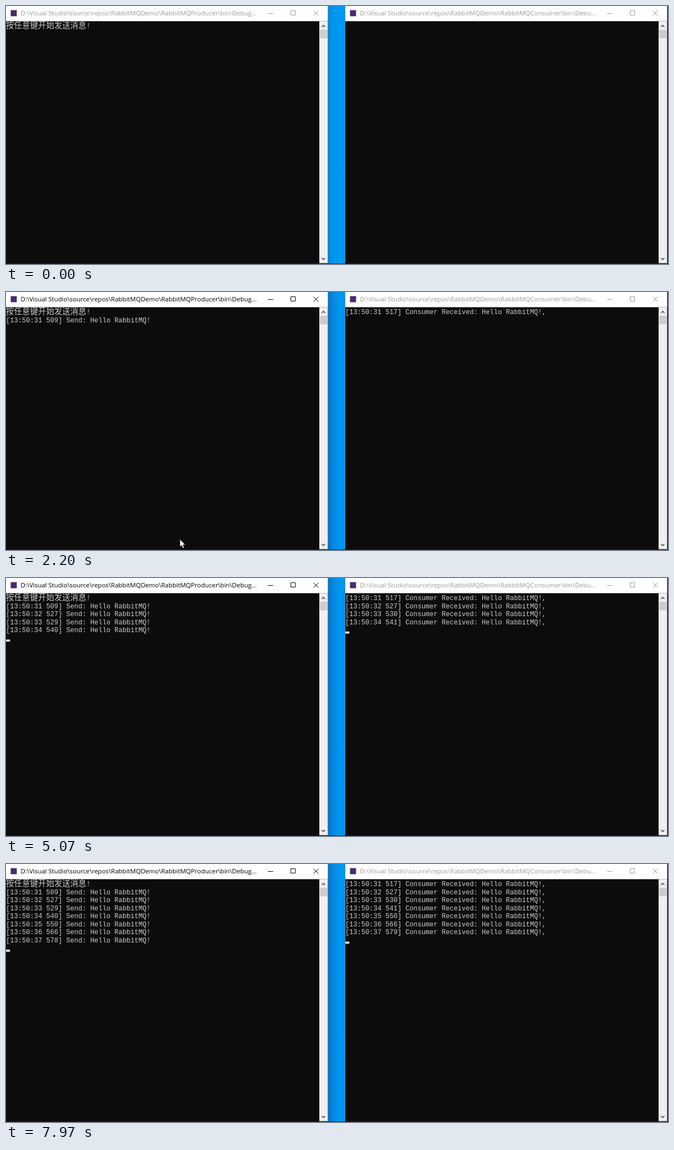
Animation of 1198x467 px, one loop 8000 ms. Source, as an HTML page:

```html
<!DOCTYPE html>
<html lang="zh">
<head>
<meta charset="utf-8">
<title>RabbitMQ demo</title>
<style>
  html, body { margin: 0; width: 100%; height: 100%; overflow: hidden; background: #0c0c0c; }
  svg { display: block; width: 1198px; height: 467px; }
  text { white-space: pre; }
  .title { font: 11.5px "Open Sans", "Noto Sans", sans-serif; }
  .log { font: 12.12px "Liberation Mono", "Courier New", monospace; fill: #ccc; }
  .cjk { font: 300 14.54px "Noto Sans CJK SC", "Noto Sans CJK", sans-serif; fill: #ccc; }
  .win { color: #999; }
  .win.active { color: #000; }
  .bar { fill: currentColor; }
  .icon { fill: none; stroke: currentColor; }
  .arrow { fill: none; stroke: #505050; stroke-width: 1.7; }
</style>
</head>
<body>
<svg id="stage" viewBox="0 0 1198 467">
  <defs>
    <linearGradient id="calm">
      <stop offset="0" stop-color="#0486d8"/>
      <stop offset=".22" stop-color="#0294ea"/>
      <stop offset=".7" stop-color="#0099f3"/>
      <stop offset="1" stop-color="#0294ea"/>
    </linearGradient>
    <linearGradient id="deep">
      <stop offset="0" stop-color="#0674c4"/>
      <stop offset=".3" stop-color="#038ae2"/>
      <stop offset=".7" stop-color="#0097f1"/>
      <stop offset="1" stop-color="#0294ea"/>
    </linearGradient>
  </defs>
  <rect id="desk" x="583" width="31" height="467" fill="url(#calm)"/>
</svg>
<script>
const LOOP = 8000, BLINK = 530, CELL = 7.272, ROW = 14.55, TOP = 27.5;
const FOCUS = 500;
const sends = [1670, 2700, 3700, 4700, 5700, 6700, 7730];
const sentMs = [509, 527, 529, 540, 550, 566, 578];
const gotMs = [517, 527, 530, 541, 550, 566, 579];
const stage = document.getElementById('stage');
const $ = id => document.getElementById(id);

const logs = (stamps, label, end, firstRow) => stamps.map((ms, i) =>
  `<text class="log line${i}" x="0" y="${TOP + 12.5 + ROW * (firstRow + i)}">` +
  `[13:50:${31 + i} ${ms}] ${label}: Hello RabbitMQ!${end}</text>`).join('');

const win = (id, x, path, body) => `
  <g id="${id}" class="win" transform="translate(${x} 0)">
    <rect width="583" height="466" fill="#0c0c0c"/>
    <rect width="583" height="${TOP}" fill="#fff"/>
    <rect x="567" y="${TOP}" width="15.5" height="438" fill="#f0f0f0"/>
    <rect x="568" y="43" width="13.5" height="15.5" fill="#cdcdcd"/>
    <path class="arrow" d="M571.5 38l3-3 3 3M571.5 456l3 3 3-3"/>
    <rect x="582.3" width=".7" height="466" fill="#777"/>
    <rect x="8.5" y="7.5" width="11" height="11" fill="#4b2a72"/>
    <text class="title bar" x="26.5" y="17.3">${path}</text>
    <path class="icon" d="M474 13.5h9.5M515.5 8.5h8v8h-8zM556.5 8.5l9 9M565.5 8.5l-9 9"/>
    ${body}
    <rect class="caret" width="${CELL}" height="3.7" fill="#f2f2f2"/>
  </g>`;

const repos = 'D:\\Visual Studio\\source\\repos\\RabbitMQDemo\\RabbitMQ';
const prompt = `<text class="cjk" x="0" y="40.3">按任意键开始发送消息</text>
  <text class="log" x="145.4" y="40">!</text>`;

stage.insertAdjacentHTML('beforeend',
  win('producer', 0, repos + 'Producer\\bin\\Debug...', prompt + logs(sentMs, 'Send', '', 1)) +
  win('consumer', 614, repos + 'Consumer\\bin\\Debu...', logs(gotMs, 'Consumer Received', ',', 0)) +
  `<rect y="466" width="1198" height="1" fill="#14244a"/>
   <path id="mouse" d="M0 0V13.5L3.1 10.6 5.4 15.8 7.7 14.8 5.4 9.8H9.6Z"
     fill="#fff" stroke="#000" stroke-width=".6"/>`);

const show = (el, on) => el.setAttribute('visibility', on ? 'visible' : 'hidden');
const ease = (t, from, to) => {
  const p = Math.min(1, Math.max(0, (t - from) / (to - from)));
  return p * p * (3 - 2 * p);
};

function caret(id, row, on) {
  const el = $(id).querySelector('.caret');
  el.setAttribute('y', TOP + ROW * (row + 1) - 3.4);
  show(el, on);
}

function draw(t) {
  const count = sends.filter(s => t >= s).length;
  const active = t >= FOCUS;
  $('producer').classList.toggle('active', active);
  $('desk').setAttribute('fill', active ? 'url(#deep)' : 'url(#calm)');
  sends.forEach((s, i) =>
    stage.querySelectorAll('.line' + i).forEach(el => show(el, t >= s)));

  // Each write restarts the blink; an unfocused window only flashes its caret once.
  const since = t - (count ? sends[count - 1] : FOCUS);
  caret('producer', count + 1, active && Math.floor(since / BLINK) % 2 === 0);
  caret('consumer', count, count > 0 && since < BLINK);

  const away = 1 - ease(t, 100, 450) + ease(t, 1950, 2400);
  $('mouse').setAttribute('transform', `translate(${307.8 + 12 * away} ${415 + 56 * away})`);
  show($('mouse'), away < 1);
}

const start = performance.now();
function tick() {
  draw((performance.now() - start) % LOOP);
  requestAnimationFrame(tick);
}
tick();
</script>
</body>
</html>
```
